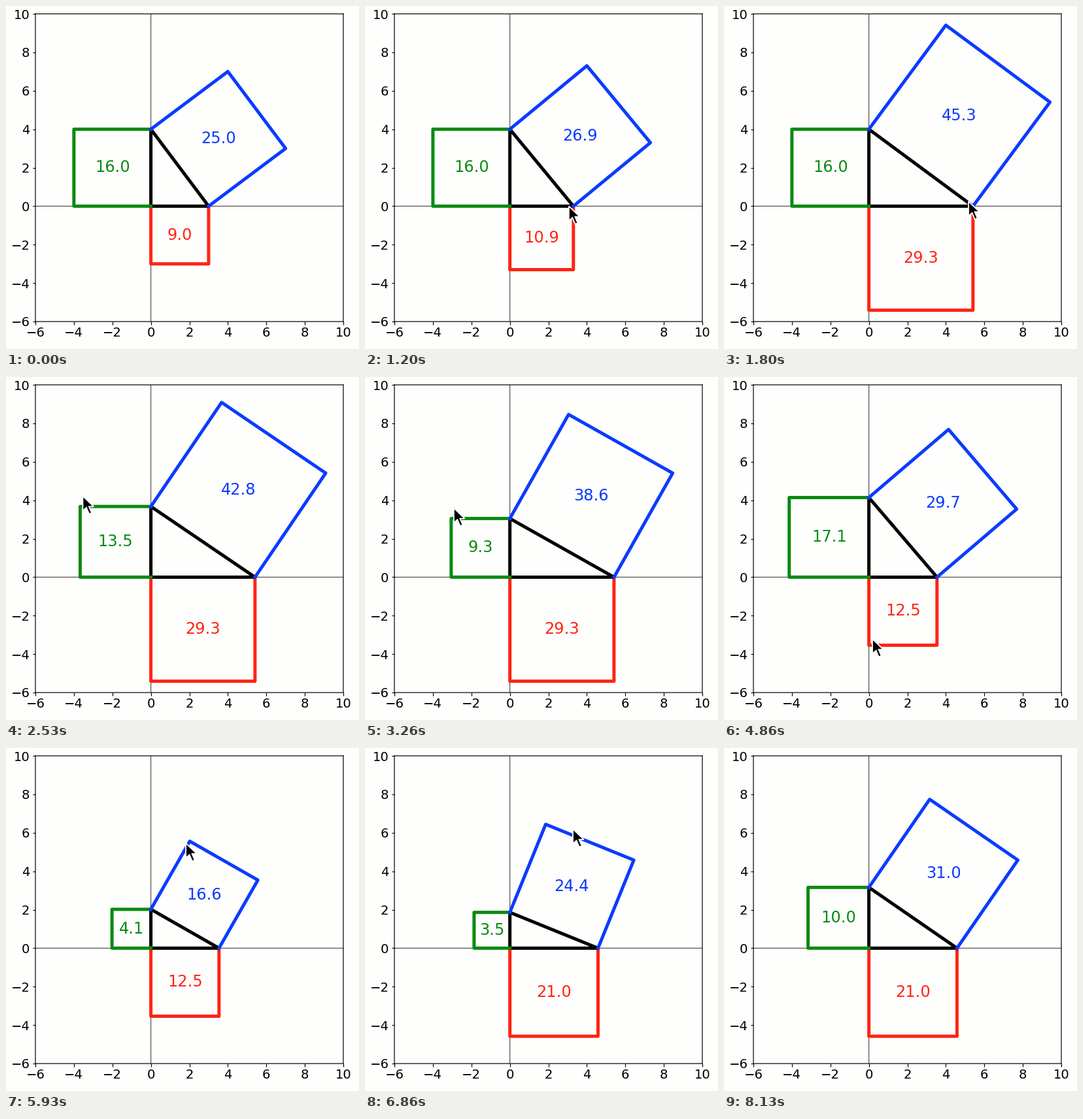
These frames come from a looping animation (540x525 px, 8730 ms). A matplotlib script:

```python
import numpy as np
import matplotlib.pyplot as plt
from matplotlib.animation import FuncAnimation

W, H, DPI = 540, 525, 72
LOOP, INTERVAL = 8730, 30
STEPS_PER_SECOND = 15
LEFT, RIGHT, TOP, BOTTOM = 45, 516, 12, 483
UNIT = (RIGHT - LEFT) / 16
ORIGIN = np.array([LEFT + 6 * UNIT, TOP + 10 * UNIT])

RED, GREEN, BLUE = "#ff2412", "#0b8a12", "#0a3bff"
PAPER = "#fefefd"
ARROW = np.array([(0, 0), (0, 22.5), (5.5, 17.7), (9.7, 27.5), (13.7, 25.8),
                  (9.5, 16.2), (16.7, 16)])

# Corners the pointer can hold, in data units.
GRIPS = {
    "base": lambda a, b: (a, 0),
    "red": lambda a, b: (0, -a),
    "green": lambda a, b: (-b, b),
    "apex": lambda a, b: (b, a + b),
    "side": lambda a, b: (a + b, a),
}
legs = {"a": [(0, 3)], "b": [(0, 4)]}
path = []


def move(step, x, y):
    """Bring the pointer tip to a pixel position at the given step."""
    path.append((step, x, y))


def drag(leg, start, end, value, grip, dx, dy):
    """Change one leg while the pointer holds a corner at a pixel offset."""
    now = {name: keys[-1][1] for name, keys in legs.items()}
    for step, length in ((start, now[leg]), (end, value)):
        now[leg] = length
        legs[leg].append((step, length))
        corner = ORIGIN + np.array(GRIPS[grip](**now)) * (UNIT, -UNIT)
        move(step, *(corner + (dx, dy)))


move(9, 484, 250)
drag("a", 17, 25, 5.41, "base", -7, 0)
move(27, 374, 299)
drag("b", 33, 39, 3.61, "green", 4, -16)
drag("b", 41, 49, 3.05, "green", 4, -16)
drag("b", 49, 54, 1.2, "green", 4, -16)
drag("b", 54, 60, 4.14, "green", 4, -16)
drag("a", 63, 72, 3.54, "red", 5, -10)
move(73, 227, 401)
move(78, 337, 83)
drag("b", 80, 89, 2.02, "apex", -6, 3)
drag("b", 89, 91, 1.86, "apex", -6, 3)
drag("a", 94, 99, 4.58, "side", -9, 0)
move(103, 318, 124)
drag("b", 108, 113, 3.16, "apex", 4, 0)
move(115, 337, 103)
move(118, 337, 103)
move(121, 499, 236)


def track(keys, step):
    """Interpolate every value column of the keys at the given step."""
    cols = np.array(keys, float).T
    return [np.interp(step, cols[0], col) for col in cols[1:]]


def to_data(points):
    return (points - ORIGIN) / UNIT * (1, -1)


fig = plt.figure(figsize=(W / DPI, H / DPI), dpi=DPI, facecolor=PAPER)
ax = fig.add_axes([LEFT / W, 1 - BOTTOM / H, (RIGHT - LEFT) / W,
                   (BOTTOM - TOP) / H], facecolor=PAPER)
ax.set(xlim=(-6, 10), ylim=(-6, 10),
       xticks=range(-6, 11, 2), yticks=range(-6, 11, 2))
ax.tick_params(labelsize=19.6, length=4.5, width=1.2, pad=4)
for label in ax.get_xticklabels() + ax.get_yticklabels():
    label.set_family("DejaVu Sans")
for spine in ax.spines.values():
    spine.set(linewidth=1.2, snap=False)
for rule in (ax.axhline, ax.axvline):
    rule(0, color="#404040", lw=1.1, zorder=1, snap=False)


def outline(color, zorder):
    return ax.plot([], [], color=color, lw=5, zorder=zorder, snap=False)[0]


def area_label(color):
    return ax.text(0, 0, "", color=color, size=24, family="DejaVu Sans",
                   ha="center", va="center", zorder=7)


red, triangle, green, blue = (
    outline(color, z) for z, color in enumerate((RED, "black", GREEN, BLUE), 2))
red_area, green_area, blue_area = map(area_label, (RED, GREEN, BLUE))
pointer = plt.Polygon(to_data(ARROW), fc="black", ec="white", lw=1.8,
                      joinstyle="miter", zorder=9, clip_on=False)
ax.add_patch(pointer)


def set_area(label, x, y, area):
    label.set_position((x, y))
    label.set_text(f"{area:.1f}")


def draw(frame):
    # The scene advances in coarser steps than the frames.
    step = int((frame * INTERVAL + 28) * STEPS_PER_SECOND / 1000)
    a, = track(legs["a"], step)
    b, = track(legs["b"], step)
    c = a + b

    triangle.set_data([0, a, 0, 0], [0, 0, b, 0])
    red.set_data([0, 0, a, a], [0, -a, -a, 0])
    green.set_data([0, -b, -b, 0], [b, b, 0, 0])
    blue.set_data([0, b, c, a], [b, c, a, 0])

    set_area(red_area, a / 2, -a / 2, a * a)
    set_area(green_area, -b / 2, b / 2, b * b)
    set_area(blue_area, c / 2, c / 2, a * a + b * b)

    pointer.set_visible(path[0][0] <= step <= path[-1][0])
    pointer.set_xy(to_data(ARROW + track(path, step)))
    return red, triangle, green, blue, pointer


anim = FuncAnimation(fig, draw, frames=LOOP // INTERVAL, interval=INTERVAL,
                     repeat=True, repeat_delay=0)
plt.show()
```
